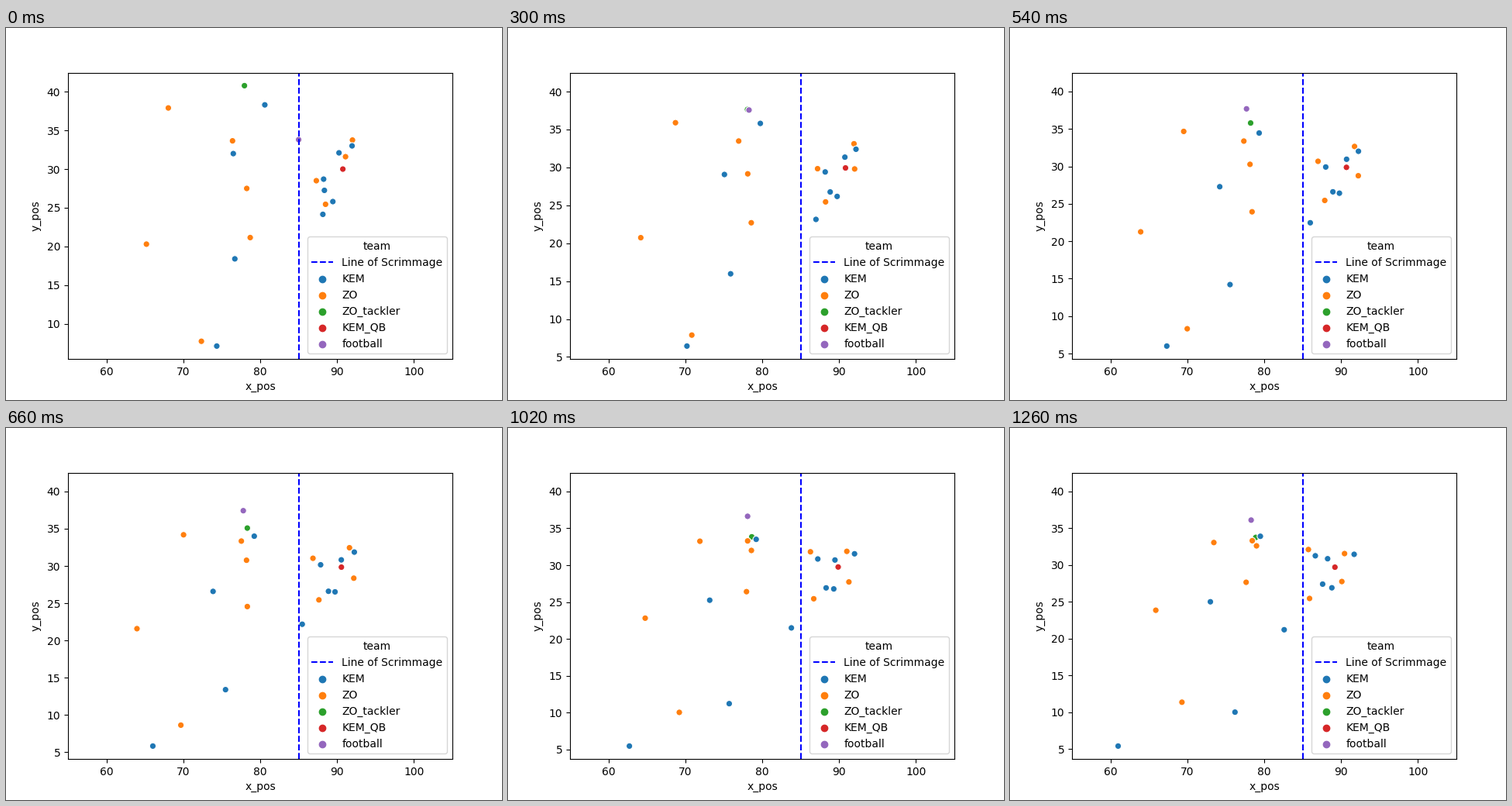
Recreate the animation shown at these times as a matplotlib script. Size 640 by 480 pixels, loop 1.32 s.

```python
import numpy as np
import matplotlib.pyplot as plt
from matplotlib.animation import FuncAnimation

FRAMES, INTERVAL = 22, 60
LAST = FRAMES - 1
CATCH = 7  # frame at which the throw has died down

# Routes in yards: start, halfway point and finish of each player.
OFFENSE = [
    [(80.6, 38.3), (79.25, 34.1), (79.5, 33.9)],
    [(76.5, 32.0), (73.95, 26.75), (73.0, 25.0)],
    [(76.7, 18.4), (75.5, 13.6), (76.2, 10.0)],
    [(74.35, 7.13), (66.35, 5.87), (61.0, 5.39)],
    [(91.95, 33.0), (92.25, 31.9), (91.7, 31.45)],
    [(90.25, 32.1), (90.6, 30.85), (88.25, 30.85)],
    [(88.25, 28.7), (87.9, 30.1), (86.65, 31.25)],
    [(88.35, 27.25), (88.9, 26.6), (87.6, 27.4)],
    [(89.45, 25.8), (89.75, 26.5), (88.8, 26.9)],
    [(88.15, 24.15), (85.6, 22.25), (82.6, 21.2)],
]
DEFENSE = [
    [(68.05, 37.9), (69.9, 34.3), (73.45, 33.05)],
    [(76.4, 33.65), (77.5, 33.35), (78.45, 33.3)],
    [(78.25, 27.5), (78.2, 30.65), (79.0, 32.6)],
    [(78.7, 21.15), (78.35, 24.4), (77.65, 27.65)],
    [(65.2, 20.3), (63.95, 21.5), (65.9, 23.85)],
    [(72.35, 7.75), (69.75, 8.55), (69.3, 11.35)],
    [(92.0, 33.75), (91.65, 32.5), (90.45, 31.55)],
    [(91.1, 31.6), (92.2, 28.45), (90.1, 27.75)],
    [(87.3, 28.5), (86.9, 30.95), (85.75, 32.1)],
    [(88.5, 25.45), (87.7, 25.45), (85.9, 25.45)],
]
TACKLER = [[(77.95, 40.78), (78.3, 35.25), (78.9, 33.75)]]
PASSER = [[(90.75, 30.0), (90.6, 29.85), (89.2, 29.7)]]
THROW, DROP, REST = np.array([(85, 33.8), (77.6, 37.95), (78.3, 36.1)])

COLORS = {
    "KEM": "tab:blue",
    "ZO": "tab:orange",
    "ZO_tackler": "tab:green",
    "KEM_QB": "tab:red",
    "football": "tab:purple",
}
TEAMS = (["ZO_tackler"] + ["ZO"] * len(DEFENSE) + ["KEM"] * len(OFFENSE)
         + ["KEM_QB", "football"])
ROUTES = np.array(TACKLER + DEFENSE + OFFENSE + PASSER)


def players(i):
    """Smooth parabola through the three points of every route."""
    u = i / LAST
    start, half, finish = ROUTES.transpose(1, 0, 2)
    return ((1 - u) * (1 - 2 * u) * start + 4 * u * (1 - u) * half
            + u * (2 * u - 1) * finish)


def ball(i):
    """A slowing throw, then a steady drift."""
    if i < CATCH:
        return DROP + (THROW - DROP) * (1 - i / CATCH) ** 1.9
    return DROP + (REST - DROP) * (i - CATCH) / (LAST - CATCH)


def positions(i):
    return np.vstack([players(i), ball(i)])


fig, ax = plt.subplots(figsize=(6.4, 4.8), dpi=100)
ax.set_xlim(55, 105)
ax.set_xlabel("x_pos")
ax.set_ylabel("y_pos", labelpad=5)

start = positions(0)
top = start[:, 1].max()
line = ax.axvline(85, color="b", ls="--", label="Line of Scrimmage")
dots = ax.scatter(*start.T, s=36, c=[COLORS[team] for team in TEAMS],
                  edgecolors="w", linewidths=0.8)
handles = [line] + [ax.scatter([], [], color=color, label=team)
                    for team, color in COLORS.items()]
ax.legend(handles=handles, title="team", loc="lower right")


def update(i):
    xy = positions(i)
    low = xy[:, 1].min()
    pad = 0.05 * (top - low)
    ax.set_ylim(low - pad, top + pad)
    dots.set_offsets(xy)
    return [dots]


anim = FuncAnimation(fig, update, frames=FRAMES, interval=INTERVAL,
                     init_func=lambda: update(0), repeat=True, repeat_delay=0)
plt.show()
```
